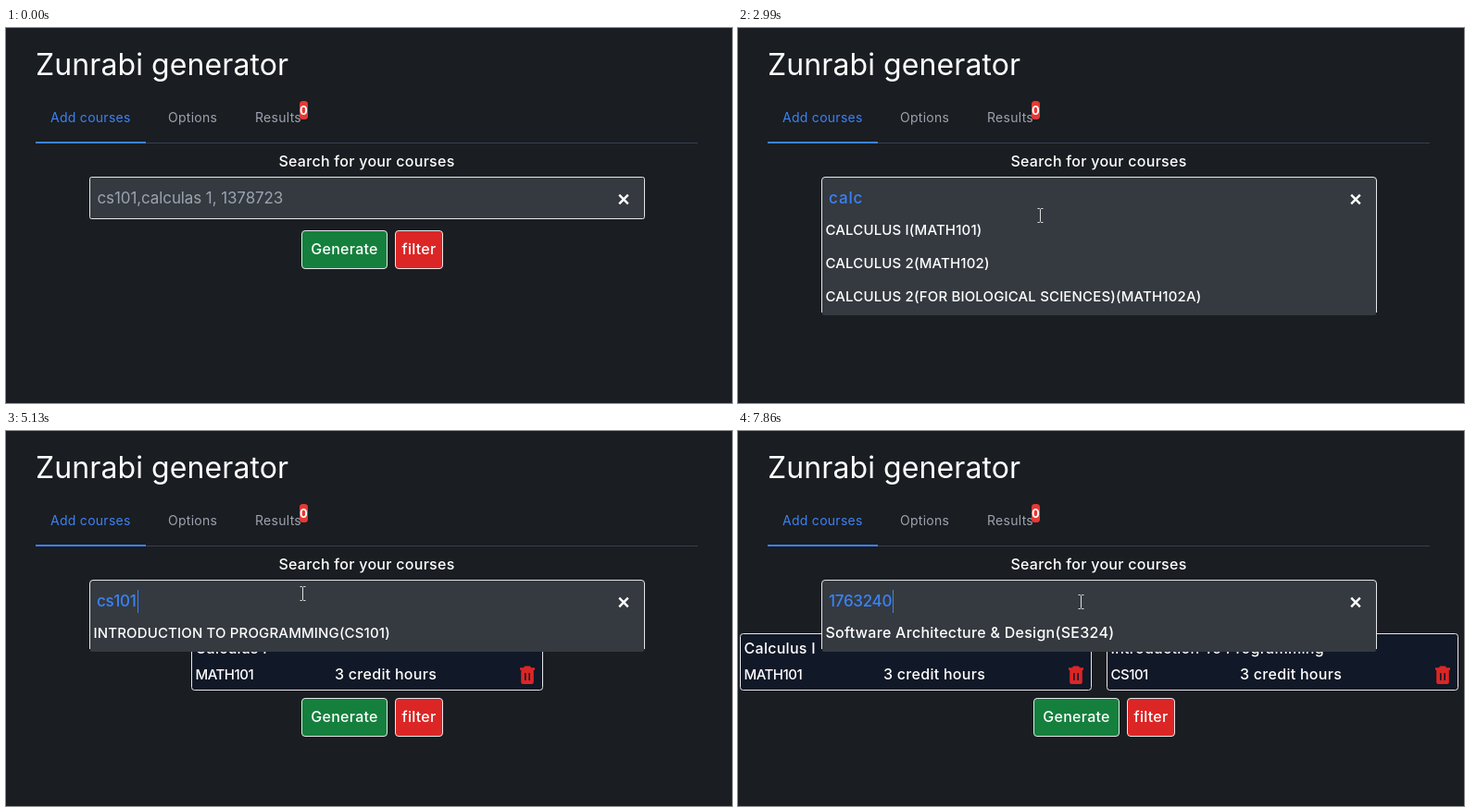
Write an HTML page that moves like this. It is 784 px wide and 406 px high and loops after 8 s.

```html
<!DOCTYPE html>
<html lang="en">
<head>
<meta charset="utf-8">
<title>Course schedule generator</title>
<style>
  html, body { margin: 0; width: 100%; height: 100%; overflow: hidden; background: #1a1d21; }
  svg { display: block; }
  text { font: 500 16px Inter, sans-serif; letter-spacing: .28px; fill: #fff; white-space: pre; }
  .title { font-size: 32px; font-weight: 400; letter-spacing: .1px; }
  .tab { font-size: 14px; font-weight: 400; fill: #9ca3af; }
  .active { fill: #3b82f6; }
  .badge { font-size: 13px; font-weight: 700; letter-spacing: 0; }
  .mid { text-anchor: middle; }
  .hint, .query { font-size: 17px; font-weight: 400; letter-spacing: -.1px; fill: #9ca3af; }
  .query { font-weight: 500; letter-spacing: -.3px; fill: #3b82f6; }
  .word { letter-spacing: .9px; }
  .caps { font-size: 15px; letter-spacing: .15px; }
  .code { font-size: 15px; letter-spacing: -.5px; }
  .edge { stroke: #e5e7eb; }
</style>
</head>
<body>
<svg width="784" height="406" viewBox="0 0 784 406">
  <text class="title" x="32" y="51">Zunrabi generator</text>
  <rect x="32" y="124" width="715" height="1" fill="#374151"/>
  <rect x="32" y="123" width="119" height="2" fill="#3b82f6"/>
  <text class="tab active" x="48" y="102">Add courses</text>
  <text class="tab" x="175" y="102">Options</text>
  <text class="tab" x="269" y="102">Results</text>
  <rect x="317" y="79" width="9" height="20" rx="3.5" fill="#e53935"/>
  <text class="badge mid" x="321.5" y="94">0</text>
  <text class="mid" x="389.5" y="150">Search for your courses</text>
  <g id="cards"></g>
  <g id="buttons">
    <rect class="edge" x="319.5" y="219.5" width="92" height="41" rx="3.5" fill="#15803d"/>
    <text class="mid" x="365.5" y="245">Generate</text>
    <rect class="edge" x="420.5" y="219.5" width="51" height="41" rx="3.5" fill="#dc2626"/>
    <text class="mid" x="446" y="245">filter</text>
  </g>
  <g id="search"></g>
  <rect id="caret" y="172" width="1" height="25"/>
  <path d="M662.2 180.7l9.6 9.6m0-9.6l-9.6 9.6" stroke="#fff" stroke-width="2.4"/>
  <g id="mouse"></g>
</svg>
<script>
const LOOP = 8000;
const $ = id => document.getElementById(id);

// [time, typed text]
const typing = [
  [0, ''], [1840, 'c'], [2000, 'ca'], [2160, 'cal'], [2240, 'calc'],
  [3330, ''], [4570, 'c'], [4650, 'cs'], [4810, 'cs1'], [4890, 'cs10'], [5050, 'cs101'],
  [6440, ''], [7620, '176'], [7700, '17632'], [7780, '1763240']
];

// [from, to, text class, options]
const lists = [
  [2410, 3330, 'caps', ['CALCULUS I(MATH101)', 'CALCULUS 2(MATH102)', 'CALCULUS 2(FOR BIOLOGICAL SCIENCES)(MATH102A)']],
  [5130, 6440, 'caps', ['INTRODUCTION TO PROGRAMMING(CS101)']],
  [7860, LOOP, '', ['Software Architecture &amp; Design(SE324)']]
];

// [start, end, steps, from x, from y, to x, to y]
const moves = [
  [250, 650, 6, 604, 311, 361, 185],
  [820, 821, 1, 360.5, 186, 360.5, 186],
  [2740, 3240, 7, 355, 190, 297, 216],
  [3500, 3830, 5, 298, 212, 320.5, 176],
  [5460, 5720, 4, 331, 186, 358, 226],
  [5970, 6130, 3, 358, 225, 357, 220],
  [6540, 6710, 3, 361, 210, 370, 185]
];

const clicks = [[1070, 1180], [3150, 3330], [3910, 3990], [6210, 6440], [7130, 7210]];
const carets = [[1180, 1590], [1840, 2910], [3990, 4400], [4570, 5630], [6130, 6210], [7210, LOOP]];

const shapes = {
  beam: '<path d="M-3 -7.5h2.2l.8.8.8-.8H3M0-6.7V6.7M-3 7.5h2.2l.8-.8.8.8H3" fill="none" stroke="#ddd"/>',
  arrow: '<path d="M0 0V16.5l3.8-3.6 2.5 5.8 2.7-1.2-2.5-5.6h5.2z" fill="#fff" stroke="#111" stroke-width=".8"/>',
  hand: '<path d="M0 1.5a1.7 1.7 0 0 1 3.4 0V7.5l5 1.2q2.3.6 2.3 3v4L9.2 22.5H1.7L-3.5 14q-1-2 .5-2.6 1.5-.5 3 1.6z" fill="#fff" stroke="#111" stroke-width=".6"/>'
};

const within = (t, spans) => spans.some(([a, b]) => t >= a && t < b);
const last = (t, rows) => rows.filter(r => t >= r[0]).pop();
const text = (x, y, s, cls = '') => `<text class="${cls}" x="${x}" y="${y}">${s}</text>`;

function pointer(t) {
  const m = last(t, moves);
  if (!m) return null;
  const [a, b, n, x0, y0, x1, y1] = m;
  const p = n < 2 ? 1 : Math.min(1, Math.floor((t - a) / (b - a) * (n - 1) + .05) / (n - 1));
  return { x: x0 + (x1 - x0) * p, y: y0 + (y1 - y0) * p };
}

function card(x, name, code, hours) {
  return `<g transform="translate(${x} 219)">
    <rect class="edge" x=".5" y=".5" width="379" height="61" rx="3" fill="#111827"/>
    ${text(4.5, 22, name)}${text(4.5, 50, code, 'code')}${text(hours, 50, '3 credit hours')}
    <g transform="translate(355 35)" fill="#dc2626">
      <path d="M5 .5h6l1 1.7h4v2.6H0V2.2h4zM1.2 4.5h13.6V18q0 2-2 2H3.2q-2 0-2-2z"/>
      <path d="M5 8h1.6v8H5zM9.4 8H11v8H9.4z" fill="#111827"/>
    </g></g>`;
}

function cards(t) {
  if (t < 3330) return '';
  const second = t >= 6440;
  return card(second ? 2 : 200, 'Calculus I', 'MATH101', 155) +
    (second ? card(398, 'Introduction To Programming', 'CS101', 144) : '');
}

function search(query, options, cls, hover) {
  const end = 203 + 36 * options.length;
  const sides = `V165q0-3.5 3.5-3.5H686q3.5 0 3.5 3.5V${end - 3}`;
  const box = options.length
    ? `<path d="M90.5 ${end - 3}${sides}q0 3-3 3H93.5q-3 0-3-3" fill="#343a40"/>
       <path class="edge" d="M90.5 ${end - 3}${sides}" fill="none"/>`
    : '<rect class="edge" x="90.5" y="161.5" width="599" height="45" rx="2" fill="#343a40"/>';
  const rows = options.map((s, i) => {
    const on = i === hover, y = 203 + 36 * i;
    const back = on ? `<path d="M91 ${y}h598v36H91z" fill="#1a1d21"/><path class="edge" d="M91.5 ${y}v36M688.5 ${y}v36"/>` : '';
    return back + text(on ? 95.5 : 94.5, y + 21, s, cls);
  });
  const field = query
    ? text(98, 190, query, /\d/.test(query) ? 'query' : 'query word')
    : text(98.5, 190, 'cs101,calculas 1, 1378723', 'hint');
  return box + field + rows.join('');
}

function mouse(p, listed, clicked) {
  if (!p) return '';
  const inField = p.x > 90 && p.x < 690 && p.y > 161 && p.y < (listed ? 206 : 207);
  const shape = inField ? 'beam' : listed ? 'hand' : 'arrow';
  const x = inField ? Math.floor(p.x) + .5 : p.x;
  return (clicked ? `<circle cx="${p.x}" cy="${p.y}" r="11.8" fill="#fe0" opacity=".6"/>` : '') +
    `<g transform="translate(${x} ${Math.round(p.y)})">${shapes[shape]}</g>`;
}

const shown = {};
function put(id, html) {
  if (shown[id] !== html) $(id).innerHTML = shown[id] = html;
}

function draw(t) {
  const query = last(t, typing)[1];
  const [, , cls, options] = lists.find(([a, b]) => t >= a && t < b) || [0, 0, '', []];
  const p = pointer(t);
  const hover = p && p.y >= 206 ? Math.floor((p.y - 203) / 36) : -1;

  put('cards', cards(t));
  $('buttons').setAttribute('transform', `translate(0 ${t < 3330 ? 0 : 70})`);
  put('search', search(query, options, cls, hover));
  put('mouse', mouse(p, options.length > 0, within(t, clicks)));

  const typed = document.querySelector('.query');
  const caret = $('caret');
  caret.setAttribute('x', Math.round(99 + (typed ? typed.getComputedTextLength() : 0)));
  caret.setAttribute('fill', query ? '#3b82f6' : '#9ca3af');
  caret.setAttribute('visibility', within(t, carets) ? 'visible' : 'hidden');
}

const start = performance.now();
function tick() {
  draw((performance.now() - start) % LOOP);
  requestAnimationFrame(tick);
}
tick();
</script>
</body>
</html>
```
